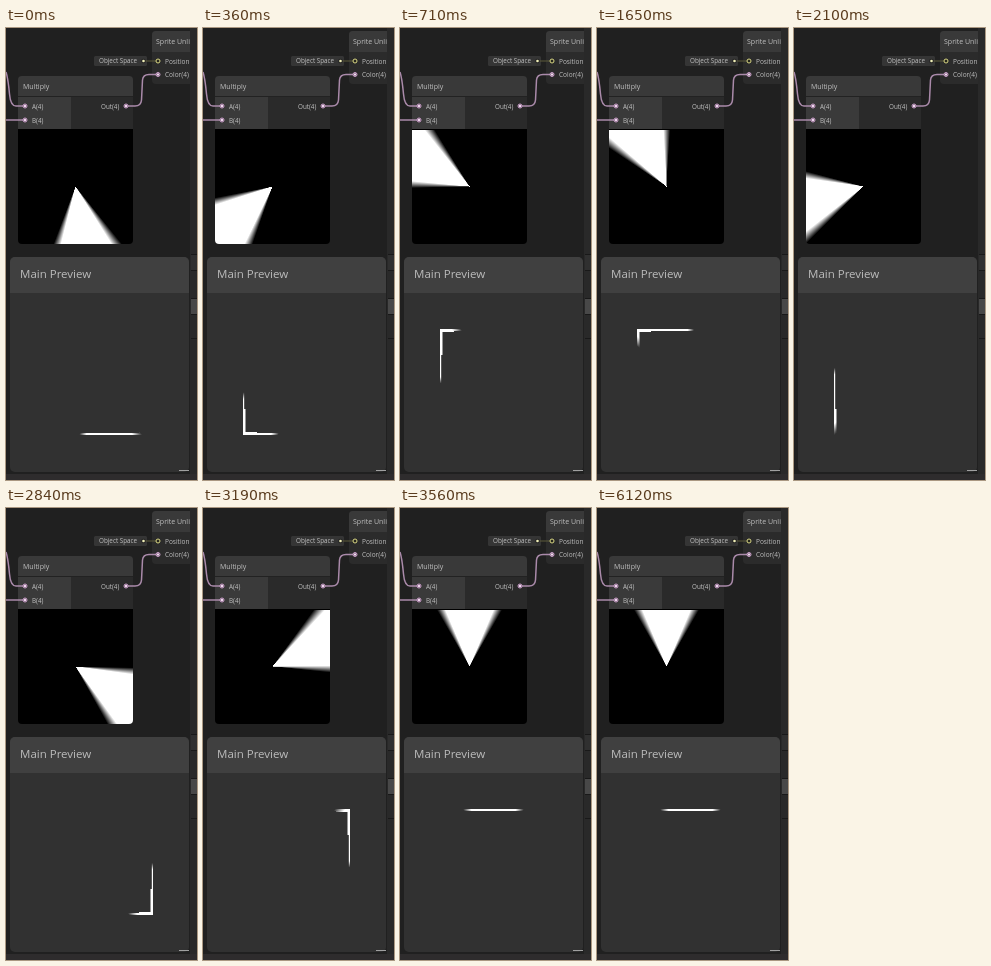
An HTML page for the animation above (6.18 s loop, 191x452 px).

```html
<!DOCTYPE html>
<html lang="en">
<head>
<meta charset="utf-8">
<title>Shader graph preview</title>
<style>
  html, body { margin: 0; width: 100%; height: 100%; overflow: hidden; background: #202020; }
  #stage { position: relative; width: 191px; height: 452px; overflow: hidden; }
  svg { position: absolute; left: 0; top: 0; font-family: "Open Sans", "Noto Sans", sans-serif; }
  .beam {
    position: absolute;
    background: conic-gradient(from calc(var(--angle, 171deg) - 30deg) at var(--center),
      transparent 0, #fff 7deg, #fff 53deg, transparent 60deg);
  }
  #wedge {
    --center: 57.5px 56.5px;
    left: 12px; top: 102px; width: 115px; height: 114px; border-radius: 0 0 4px 4px;
  }
  /* thin square outline with thicker corner brackets */
  #frame {
    --center: 50% 50%;
    left: 40px; top: 301px; width: 107px; height: 106px;
    clip-path: path(evenodd, "M0 0H107V106H0Z M2.5 3H14V2H93V3H104.5V26H105.8V80H104.5V103H93V104H14V103H2.5V80H1.2V26H2.5Z");
  }
</style>
</head>
<body>
<div id="stage">
  <svg width="191" height="452" viewBox="0 0 191 452">
    <defs>
      <clipPath id="graph"><path d="M0 0H184V446H0Z"/></clipPath>
      <clipPath id="node"><rect x="12" y="48" width="115" height="168" rx="4"/></clipPath>
      <clipPath id="panel"><rect x="4" y="229" width="179" height="215" rx="5"/></clipPath>
      <g id="port">
        <circle r="2" fill="#3a2c3a" stroke="#cfa3ce"/>
        <circle r="1.2" fill="#f3dcf2"/>
      </g>
      <g id="vectorPort">
        <circle r="2" fill="#25251c" stroke="#d9d784"/>
      </g>
    </defs>
    <path fill="#202020" d="M0 0H191V452H0Z"/>

    <!-- window edges -->
    <path fill="#292929" d="M184 0H191V452H184Z"/>
    <path fill="#303030" d="M185 227H191V242H185Z"/>
    <path fill="#484848" d="M185 271H191V286H185Z"/>
    <path fill="#191919" d="M185 226H191V227H185Z M185 242H191V243H185Z M185 270H191V271H185Z M185 286H191V287H185Z M185 310H191V311H185Z"/>
    <path fill="#2e2c2d" d="M0 446H191V452H0Z"/>

    <g clip-path="url(#graph)">
      <rect x="146" y="3" width="50" height="53" rx="4" fill="#2b2b2b"/>
      <path fill="#393939" d="M146 24V7q0-4 4-4H184V24Z"/>
      <rect x="88" y="28" width="53" height="10" rx="1.5" fill="#353535"/>
      <path d="M137 33H152" stroke="#5c5b3a"/>

      <g clip-path="url(#node)">
        <path fill="#393939" d="M12 48H127V69H12Z"/>
        <path fill="#3a3a3a" d="M12 69H65V101H12Z"/>
        <path fill="#2a2a2a" d="M65 69H127V101H65Z"/>
        <path fill="#000" d="M12 101H127V216H12Z"/>
        <path fill="#222" d="M12 68H127V69H12Z"/>
      </g>

      <g fill="none" stroke="#aa8aaa" stroke-width="1.5">
        <path d="M0 44Q2 50 3.500 66Q4.500 78 10 78H18"/>
        <path d="M0 92H18"/>
        <path d="M120 78H129Q135 78 135.500 72L136.500 52Q137 46.500 143 46.500H152"/>
      </g>
      <use href="#port" x="19" y="78"/>
      <use href="#port" x="19" y="92"/>
      <use href="#port" x="120" y="78"/>
      <use href="#port" x="152" y="46.500"/>
      <circle cx="137.500" cy="33" r="2.300" fill="#222"/>
      <circle cx="137.500" cy="33" r="1.300" fill="#f0efb8"/>
      <use href="#vectorPort" x="152" y="33"/>

      <g fill="#c0c0c0" font-size="6.300">
        <text x="17" y="61" font-size="7">Multiply</text>
        <text x="26" y="80.500">A(4)</text>
        <text x="26" y="94.500">B(4)</text>
        <text x="95" y="80.500">Out(4)</text>
        <text x="93" y="35.300">Object Space</text>
        <text x="150" y="16" font-size="7">Sprite Unlit</text>
        <text x="159" y="35.500" font-size="6.500">Position</text>
        <text x="159" y="48.800" font-size="6.500">Color(4)</text>
      </g>
    </g>

    <g clip-path="url(#panel)">
      <path fill="#313131" d="M4 229H183V444H4Z"/>
      <path fill="#404040" d="M4 229H183V265H4Z"/>
    </g>
    <path fill="#a0a0a0" d="M173 442H183V443H173Z"/>
    <text x="14" y="250" font-size="11.500" fill="#bcbcbc">Main Preview</text>
  </svg>
  <div id="wedge" class="beam"></div>
  <div id="frame" class="beam"></div>
</div>
<script>
  const LOOP = 6180;
  // [first change, last change, steps, from angle, to angle, ease-out power]
  const TURNS = [
    [50, 650, 16, 171, 287, 1],
    [710, 1030, 8, 287, 360, 1.28],
    [1530, 2100, 16, 360, 255, 1],
    [2180, 2300, 4, 255, 212, 1],
    [2480, 3080, 16, 212, 88, 1.35],
    [3100, 3560, 12, 88, 0, 1],
  ];
  const stage = document.getElementById("stage");

  function angleAt(time) {
    let angle = TURNS[0][3];
    for (const [start, end, steps, from, to, power] of TURNS) {
      if (time < start) break;
      const step = Math.floor((time - start) / (end - start) * (steps - 1) + 1e-6) + 1;
      const progress = Math.min(step / steps, 1);
      angle = from + (to - from) * (1 - (1 - progress) ** power);
    }
    return angle;
  }

  const origin = performance.now();
  function draw() {
    const time = (performance.now() - origin) % LOOP;
    stage.style.setProperty("--angle", angleAt(time) + "deg");
    requestAnimationFrame(draw);
  }
  draw();
</script>
</body>
</html>
```
